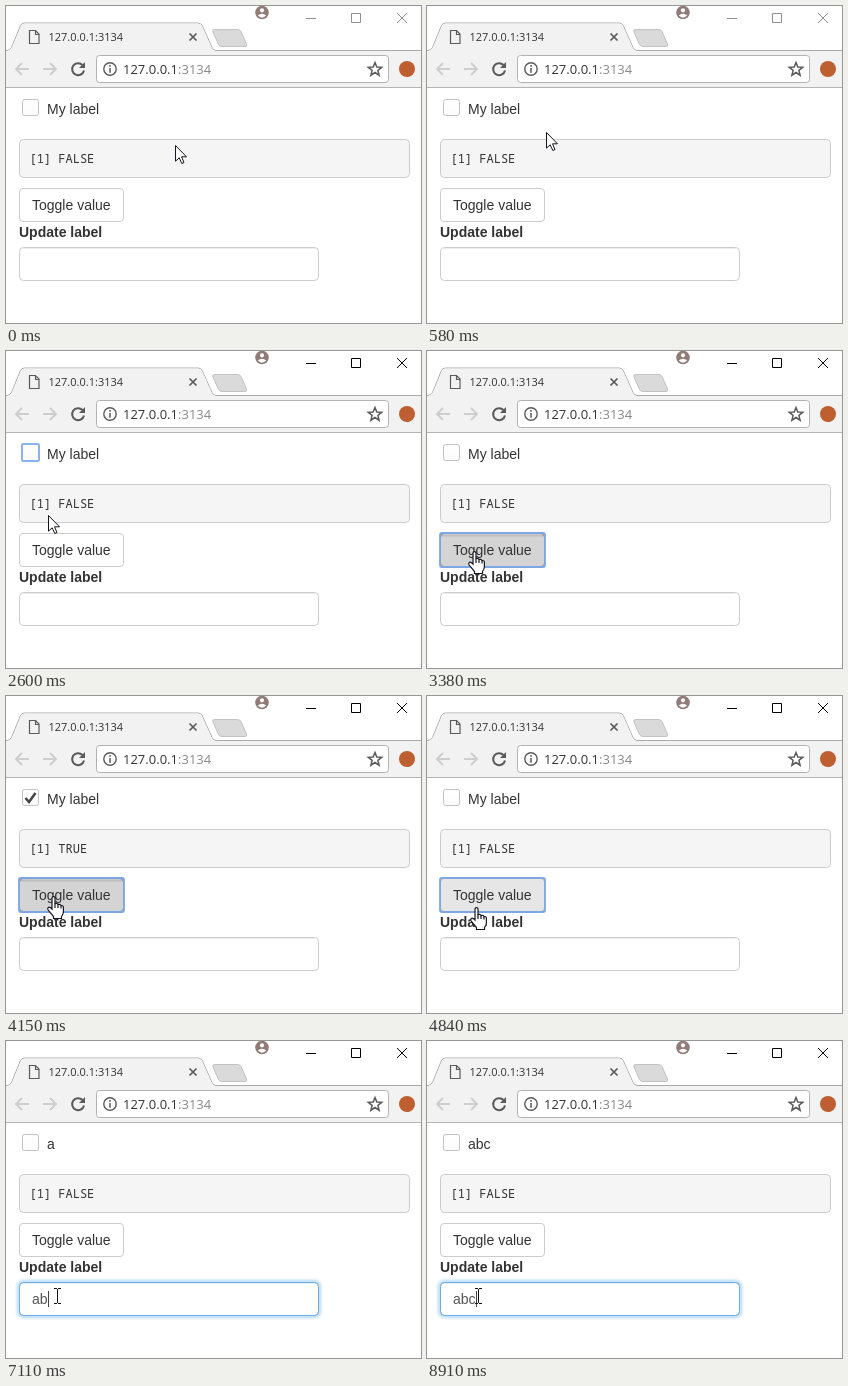
Recreate the animation shown at these times as an HTML page. Size 415x317 px, loop 9.31 s.

```html
<!DOCTYPE html>
<html lang="en">
<head>
<meta charset="utf-8">
<title>Checkbox demo</title>
<style>
  html, body { margin: 0; width: 100%; height: 100%; overflow: hidden; background: #fff; }
  svg { display: block; width: 415px; height: 317px; }
  text { font: 14px "Liberation Sans", Arial, sans-serif; fill: #333; white-space: pre; }
  .ui { font-family: "Open Sans", "Noto Sans", sans-serif; }
  .mono { font: 12px "Noto Sans Mono", "DejaVu Sans Mono", monospace; }
  .line { fill: none; stroke: #5a5a5a; }
</style>
</head>
<body>
<svg viewBox="0 0 415 317">
  <defs>
    <filter id="blur" x="-10%" y="-40%" width="120%" height="180%"><feGaussianBlur stdDeviation="1.6"/></filter>
    <linearGradient id="boxFill" x2="0" y2="1"><stop stop-color="#fff"/><stop offset="1" stop-color="#fbfbfb"/></linearGradient>
  </defs>
  <rect width="415" height="317" fill="#fff"/>

  <!-- window frame and tab -->
  <rect y="45" width="415" height="36" fill="#f2f2f2"/>
  <path d="M0 44.5H1Q4 44.5 5.5 41.500L14.500 19.500Q15.500 17 18.500 17H192Q195 17 196.200 19.500L206 41.500Q207.500 44.500 210 44.500H415" fill="none" stroke="#aaa"/>
  <path d="M1 45Q4.500 44.500 6 41.500L15 20Q16 17.500 18.500 17.500H192Q195 17.500 196 20L205.500 41.500Q207 45 210 45Z" fill="#f2f2f2"/>
  <path d="M208.500 23.500H231.500Q234 23.500 235 25.500L240.500 38Q241.300 40.500 239 40.500H216Q213.500 40.500 212.500 38.500L207 26Q206 23.500 208.500 23.500Z" fill="#dadada" stroke="#c2c2c2"/>
  <path d="M0 81.500H415" stroke="#b4b4b4"/>
  <path d="M23.500 24.500H29.500L33 28V37.500H23.500ZM29.500 24.500V28.500H33" class="line" stroke-width="1.2"/>
  <text class="ui" x="42.500" y="35" style="font-size:11px">127.0.0.1:3134</text>
  <path d="M183.500 27.500L190.500 34.500M190.500 27.500L183.500 34.500" class="line" stroke-width="1.700"/>
  <circle cx="256" cy="6.500" r="6.800" fill="#917b76"/>
  <circle cx="256" cy="4.300" r="2.100" fill="#fff"/>
  <path d="M251.800 9.500Q256 5.800 260.200 9.500Q256 13.800 251.800 9.500Z" fill="#fff"/>
  <path id="controls" d="M300 12.500H310M345.500 7.500H354.500V16.500H345.500ZM391 7L401 17M401 7L391 17" fill="none"/>

  <!-- toolbar -->
  <g class="line" stroke-width="2">
    <path d="M23 63H10.500M16 57L10 63L16 69M37 63H49.500M44 57L50 63L44 69" stroke="#cecece"/>
    <path d="M76.500 59A6 6 0 1 0 78 64.500"/>
    <path d="M79 56V62H73Z" fill="#5a5a5a" stroke="none"/>
  </g>
  <rect x="90.500" y="49.500" width="292" height="27" rx="3" fill="#fff" stroke="#b2b2b2"/>
  <circle cx="104" cy="63" r="6.200" class="line" stroke-width="1.400"/>
  <path d="M104 59V60.800M104 62V66.700" class="line" stroke-width="1.500"/>
  <text class="ui" x="117" y="68" style="font-size:13px">127.0.0.1<tspan fill="#888">:3134</tspan></text>
  <path id="star" class="line" stroke-width="1.500"/>
  <circle cx="401" cy="63" r="8" fill="#bd5f30"/>

  <!-- page -->
  <rect id="check" fill="url(#boxFill)"/>
  <path id="tick" d="M19.500 102L23 106L29.500 97" fill="none" stroke="#444" stroke-width="2.600"/>
  <text id="label" x="41" y="108"></text>
  <rect x="13.500" y="133.500" width="390" height="38" rx="4" fill="#f5f5f5" stroke="#ccc"/>
  <text id="output" class="mono" x="23.500" y="157"></text>

  <rect id="button" x="13.500" y="182.500" width="104" height="33" rx="3.500"/>
  <path id="pressShade" d="M15 185.500V184.500H116V185.500" fill="none" stroke="#000" stroke-opacity=".1" stroke-width="2"/>
  <rect id="buttonRing" x="13" y="182" width="105" height="34" rx="2" fill="none" stroke="#7ea6e4" stroke-width="1.800"/>
  <text x="26" y="204">Toggle value</text>
  <text x="13" y="231" font-weight="bold" style="font-weight:bold">Update label</text>

  <rect id="glow" x="12.500" y="240.500" width="301" height="35" rx="4.500" fill="none" stroke="#66afe9" stroke-width="2.500" filter="url(#blur)"/>
  <rect x="13.500" y="241.500" width="299" height="33" rx="4" fill="#fff" stroke="#ccc"/>
  <path d="M16 242.500H310" stroke="#eee"/>
  <rect id="inputRing" x="13.500" y="241.500" width="299" height="33" rx="4" fill="none" stroke="#66afe9"/>
  <text id="field" x="26" y="263" style="fill:#555"></text>
  <rect id="caret" y="250" width="1" height="16" fill="#444"/>

  <g id="pointer">
    <path id="arrow" d="M.5 .5V16.200L4.200 12.800L6.800 18.500L9 17.500L6.500 11.800H11.500Z" fill="#fff" stroke="#15151f"/>
    <g id="hand" transform="translate(-6 0)" stroke="#15151f" stroke-width="1.200">
      <path d="M5 2Q5 .6 6.500 .6Q8 .6 8 2V7.500Q10.500 6.800 11 8.500Q13.500 7.800 14 9.500Q16.400 9.300 16.400 11.500V16Q16.400 18 14.500 20.500V22.500H6.500V20.500L1 13.800Q.2 12 1.500 11.200Q3 10.700 5 13Z" fill="#fff"/>
      <path d="M8 7.500V12M11 8.500V12M14 9.500V12.500" fill="none"/>
    </g>
    <path id="beam" d="M-3 -7.500H0M1 -7.500H4M.5 -7V7M-3 7.500H0M1 7.500H4" fill="none" stroke="#111"/>
  </g>
</svg>
<script>
const LOOP = 9310, STEP = 230 / 3;
const el = id => document.getElementById(id);
const set = (id, attrs) => { for (const k in attrs) el(id).setAttribute(k, attrs[k]); };
const show = (id, on) => set(id, { opacity: +on });

el('star').setAttribute('d', 'M' + Array.from({ length: 10 }, (_, i) => {
  const a = (i / 5 - .5) * Math.PI, r = i % 2 ? 3 : 7;
  return (369 + r * Math.cos(a)).toFixed(1) + ' ' + (63.5 + r * Math.sin(a)).toFixed(1);
}).join('L') + 'Z');

const initial = {
  at: [169, 139], cursor: 'arrow', active: false, checked: false, boxFocus: false, boxDown: false,
  value: 'FALSE', label: 'My label', btn: 'rest', btnFocus: false, focus: 0, field: '', caret: false
};

// Evenly spaced steps, rounded to the 10 ms clock.
const steps = (start, patches) =>
  patches.map((patch, i) => [Math.round((start + i * STEP) / 10) * 10, patch]);

const approach = Array.from({ length: 10 }, (_, i) => {
  const p = (i + 1) / 10, e = p * p * (3 - 2 * p);
  const at = [Math.round(169 - 143 * e), Math.round(139 - 37 * e)];
  return { at, cursor: at[0] < 94 && at[1] < 113 ? 'hand' : 'arrow' };
});

const timeline = [
  ...steps(280, approach),
  [1210, { active: true }],
  ...steps(1360, [{ checked: true, boxFocus: true }, { value: 'TRUE' }]),
  ...steps(1990, [{ boxDown: true }, {}, { boxDown: false, checked: false }, { value: 'FALSE' }]),
  ...steps(2370, [
    { at: [28, 106] }, { at: [32, 121], cursor: 'arrow' }, { at: [38, 143] }, { at: [42, 164] },
    { at: [45, 182], cursor: 'hand', btn: 'hover' }, { at: [46, 194] }, { at: [46, 199] }
  ]),
  ...steps(3380, [
    { at: [47, 200], btn: 'down', btnFocus: true, boxFocus: false }, {},
    { btn: 'hover' }, { checked: true, value: 'TRUE' }
  ]),
  ...steps(4150, [{ btn: 'down' }, {}, { btn: 'hover' }, { checked: false, value: 'FALSE' }]),
  ...steps(4840, [
    { at: [49, 211] }, { at: [50, 228], cursor: 'arrow', btn: 'focus' },
    { at: [51, 246], cursor: 'beam' }, { at: [51, 252] }
  ]),
  ...steps(5240, [
    { at: [51, 255], btn: 'rest', btnFocus: false, focus: .1 },
    { focus: .6, caret: true }, { focus: .95 }, { focus: 1 }
  ]),
  [5860, { caret: false }],
  [6410, { caret: true }],
  [6560, { field: 'a' }],
  [6960, { label: 'a' }],
  [7110, { field: 'ab' }],
  [7510, { label: 'ab' }],
  [7660, { caret: false }],
  [7900, { field: 'abc', caret: true }],
  [8210, { label: 'abc' }],
  [8360, { caret: false }],
  [8910, { caret: true }]
];

const buttonLook = {
  rest: ['#fff', '#ccc'], hover: ['#e6e6e6', '#adadad'],
  focus: ['#e6e6e6', '#8c8c8c'], down: ['#d4d4d4', '#8c8c8c']
};
const caretX = [26, 34, 42, 49];

function draw(s) {
  set('controls', { stroke: s.active ? '#000' : '#8f8f8f' });
  set('check', s.boxFocus
    ? { x: 16, y: 93, width: 17, height: 17, rx: 1.5, stroke: '#8ab2f0', 'stroke-width': 2 }
    : { x: 16.5, y: 93.5, width: 16, height: 16, rx: 2, stroke: '#c2c2c2', 'stroke-width': 1 });
  set('check', { fill: s.boxDown ? '#e8e8e8' : 'url(#boxFill)' });
  show('tick', s.checked);
  el('label').textContent = s.label;
  el('output').textContent = '[1] ' + s.value;

  const [fill, stroke] = buttonLook[s.btn];
  set('button', { fill, stroke });
  show('pressShade', s.btn === 'down');
  show('buttonRing', s.btnFocus);

  set('glow', { opacity: s.focus * .6 });
  set('inputRing', { opacity: s.focus });
  el('field').textContent = s.field;
  set('caret', { x: caretX[s.field.length] });
  show('caret', s.caret);

  set('pointer', { transform: `translate(${s.at})` });
  for (const id of ['arrow', 'hand', 'beam']) show(id, id === s.cursor);
}

const start = performance.now();
function tick() {
  const t = (performance.now() - start) % LOOP;
  const past = timeline.filter(([time]) => time <= t).map(([, patch]) => patch);
  draw(Object.assign({}, initial, ...past));
  requestAnimationFrame(tick);
}
tick();
</script>
</body>
</html>
```
